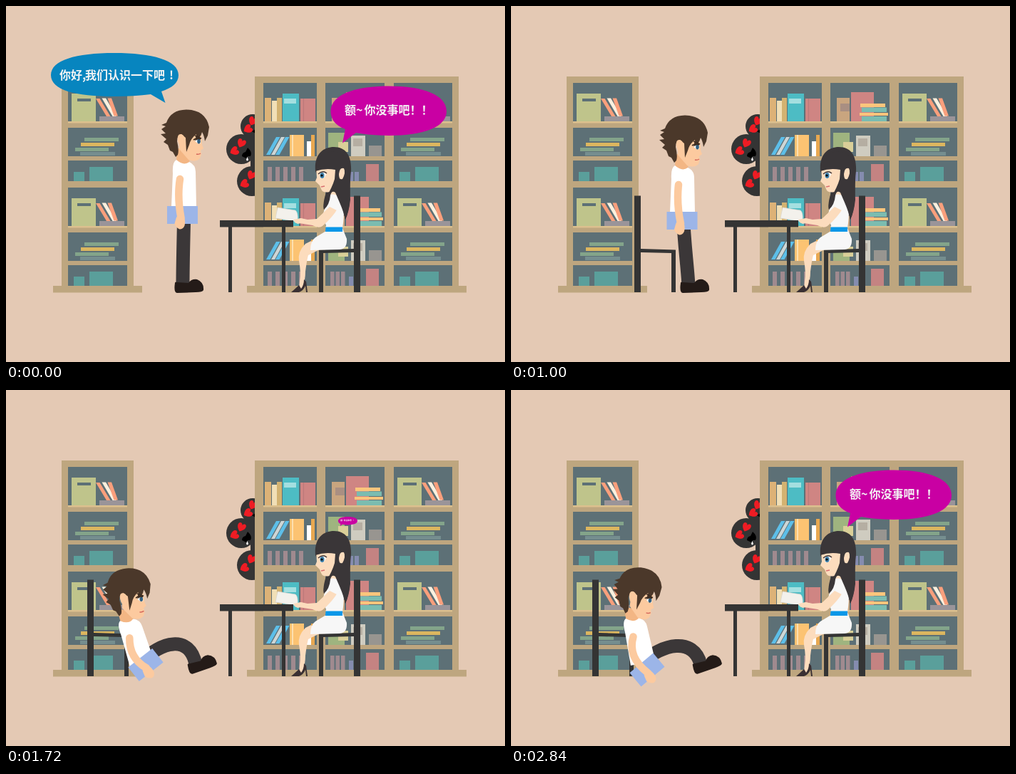
These frames come from a looping animation (700x500 px, 2.88 s). An HTML page:

```html
<!DOCTYPE html>
<html lang="zh-CN">
<head>
<meta charset="utf-8">
<title>图书馆</title>
<style>
  html, body { margin: 0; width: 100%; height: 100%; overflow: hidden; background: #e4c9b4; }
  svg { display: block; width: 700px; height: 500px; }
  text { font: 700 16px "Noto Sans CJK SC", "Noto Sans CJK", "Noto Sans", sans-serif; fill: #f4f4f4; }
</style>
</head>
<body>
<svg viewBox="0 0 700 500">
  <defs>
    <path id="heart" fill="#ee1c24" d="M0,6 C-9,0 -6,-7 -2.5,-6 Q0,-5.500 0,-3 Q0,-5.500 2.500,-6 C6,-7 9,0 0,6z"/>
    <path id="seat" fill="#343434" d="M0,266.500H9V341L58,342.500V402H52V347L9,346V402H0z"/>
  </defs>

  <g id="ornament">
    <g fill="#343434">
      <circle cx="346" cy="169" r="17"/><circle cx="330" cy="201" r="21"/>
      <circle cx="345" cy="246" r="21"/><path d="M343,180h8v50h-8z"/>
    </g>
    <use href="#heart" transform="translate(346 162) rotate(25)"/>
    <use href="#heart" transform="translate(339 173) rotate(60)"/>
    <use href="#heart" transform="translate(330 193) rotate(25)"/>
    <use href="#heart" transform="translate(320 204) rotate(65)"/>
    <use href="#heart" transform="translate(344 238) rotate(25)"/>
    <use href="#heart" transform="translate(334 250) rotate(65)"/>
    <path d="M339,199Q346,205 343,211L339,211L337,214L331,211Q331,206 336,205zM345,176l5,-3v6z"/>
    <path fill="#fff" d="M338.500,212l1.500,4q-1.500,3 -3,0z"/>
  </g>
  <g id="shelves"></g>

  <g id="girl">
    <use href="#seat" transform="matrix(-1 0 0 1 497 0)"/>
    <path fill="#3a3638" d="M434,232C432,208 445,198 460,198C478,198 485,212 484,232C481,256 486,276 476,300Q474,290 468,280L452,276L446,286Q444,277 449,262z"/>
    <path fill="#fcdcbd" d="M428,330L420,334Q409,345 411,358Q414,374 412,387L411,398L416,397Q420,384 420,373Q422,357 424,350L440,342z"/>
    <path fill="#3a3033" d="M400,402Q407,396 411,392L414,397Q418,392 418,384L421,387L423,402H421L420,393Q417,400 411,402z"/>
    <path fill="#fcdcbd" d="M435,228H468V250Q465,258 464,270H452L454,261Q444,263 442,257L440,252L434,246L436,241z"/>
    <path fill="#f7f7f7" d="M451,266Q460,262 468,268Q477,282 472,312L478,327Q479,341 468,342L427,343Q427,330 434,325L449,316Q450,308 446,301Q443,291 449,281z"/>
    <path fill="#0a97e8" d="M448.500,310.500H472V317H448z"/>
    <path fill="#3a3638" d="M434,230Q438,204 460,204Q480,208 481,230Q482,258 483,272Q481,290 476,300Q474,290 468,276L462,262Q457,258 455,266Q454,279 446,286Q444,278 450,267Q458,254 461,243L462,230Q448,227 434,232z"/>
    <path fill="#fcdcbd" d="M467,236Q468,226 474,228Q477,234 472,243Q467,245 467,236z"/>
    <path fill="#fcdcbd" d="M454,282Q462,277 466,283Q459,296 444,309Q439,313 430,308L411,305Q404,306 404,301L414,298L423,300L436,299z"/>
    <path fill="#f7f7f7" d="M455,274L467,274L466,288L452,281z"/>
    <path fill="#fff" d="M440,235Q445,231 449,236Q447,243 441,242z"/>
    <ellipse cx="443.500" cy="238" rx="3" ry="4" fill="#3f7fa8"/><circle cx="443" cy="238" r="1.600"/>
    <path fill="none" stroke="#3a3033" stroke-width="1.400" d="M438,236Q444,230 450,235"/>
    <path fill="none" stroke="#d96f70" stroke-width="1.500" d="M442,254L447,253"/>
  </g>
  <g>
    <path fill="#f3f1ec" stroke="#d9d4ce" stroke-width=".7" d="M381,283L406,287Q410,290 409,301L403,302L378,298z"/>
    <path fill="#343434" d="M300,301H403V310.500H392V402H387V310.500H317V402H312V310.500H300z"/>
    <path fill="#fcdcbd" d="M403,300L414,298L418,304L409,306z"/>
  </g>

  <use id="chair" href="#seat"/>
  <g id="man">
    <path id="leg" fill="none" stroke="#3b3738" stroke-width="19"/>
    <path id="shoe" fill="#241b18" d="M-11,1Q-11,-1 -8,0L8,1Q12,-5 20,-4Q30,0 29,11Q28,14 18,14L-8,15Q-13,15 -11,1z"/>
    <g id="torso">
      <path fill="#f3b684" d="M-9,-18L9,-10L8,6Q1,12 -10,1z"/>
      <path fill="#fff" d="M-10,-1Q0,8 8,2Q17,6 17,16L18,65H-17L-15,18Q-16,2 -10,-1z"/>
    </g>
    <g id="head">
      <path fill="#fcca9f" d="M-5,-36L24,-38L26,-24Q25,-21 28,-15L24,-12L25,-7L23,-1Q17,5 7,1L-6,-14z"/>
      <path fill="#4b382a" d="M-11,-3L-15,-10L-19,-12L-22,-20L-28,-24L-24,-28L-32,-35L-25,-36L-31,-42L-25,-46L-31,-48L-24,-51Q-18,-69 4,-69.500Q31,-69 36,-45L34,-33L30,-25Q29,-33 26,-38Q24,-29 16,-25L18,-35Q10,-29 8,-20L4,-10L3,-30L-3,-35Q-9,-34 -9,-25Q-6,-12 -8,-6z"/>
      <path fill="#fcca9f" d="M-8,-27Q-9,-36 -3,-35Q3,-33 1,-24Q-1,-18 -4,-19Q-7,-20 -8,-27z"/>
      <path fill="#fff" d="M16,-26L24,-28V-22Q19,-21 16,-26z"/>
      <ellipse cx="21.500" cy="-25" rx="2.300" ry="3.400" fill="#315f80"/>
      <path fill="none" stroke="#3b2b20" stroke-width="1.700" d="M14,-27Q18,-30 24,-28M16,-33L25,-29"/>
      <path fill="none" stroke="#d5675c" stroke-width="1.500" d="M18,-7Q21,-6 24,-8"/>
    </g>
    <path id="book" fill="#9cb5e8" d="M-21.500,-12.500H21.500V12.500H-21.500z"/>
    <path id="arm" fill="none" stroke="#fcca9f" stroke-width="10.500" stroke-linecap="round"/>
    <path id="hand" fill="#fcca9f" d="M-7,1Q-6,-4 3,-3Q7,3 5,11Q3,16 -2,16Q-8,13 -9,8z"/>
  </g>
  <path id="burst" fill="#def1fc" d="M-46,12L-24,0L-28,-9L-15,-9L-5,-21L6,-10L26,-13L18,-2L53,4L21,9L33,22L5,14L-4,21L-12,13z"/>

  <g id="hello">
    <path fill="#0785bf" d="M152,66C205,66 242,76 242,97C242,108 233,115 218,120L223.500,136L203,124Q180,127 152,127C97,127 63,118 63,97C63,76 98,66 152,66z"/>
    <text y="103"><tspan x="75">你好,</tspan><tspan x="111">我们认识一下吧</tspan><tspan x="229">!</tspan></text>
  </g>
  <g id="reply">
    <path fill="#c900a3" d="M537,112.500C586,112.500 618,125 618,148C618,170 586,182 537,182Q511,182 491,178L472,192.500L476,173C462,168 455.500,159 455.500,148C455.500,125 488,112.500 537,112.500z"/>
    <text y="152"><tspan x="475">额~</tspan><tspan x="502.500">你没事吧！！</tspan></text>
  </g>
</svg>
<script>
const $ = id => document.getElementById(id);
const WOOD = '#bea67f', BACK = '#5d7076', LEDGE = '#dcc08e';
const rect = (fill, x, y, w, h) => `<rect x="${x}" y="${y}" width="${w}" height="${h}" fill="${fill}"/>`;
const lean = (fill, x, y, w, dx, dy) => `<path fill="${fill}" d="M${x},${y}h${w}l${dx},${dy}h${-w}z"/>`;
const row = (fill, xs, y, w, h) => xs.map(x => rect(fill, x, y, w, h)).join('');

// Each bay is drawn in the coordinates of its upper half; the lower half repeats it.
const bays = {
  stacks: () => rect('#bfc48b', 5, 123, 34, 39) + rect(BACK, 13, 130, 19, 4) +
    lean('#fa9f7c', 39, 130, 5.5, 15, 25) + lean('#fbf0de', 47.5, 129.5, 5.5, 15, 25.5) +
    lean('#fa9f7c', 55.5, 129.5, 5.5, 9, 25) + rect('#9a9499', 44, 155, 35, 7) +
    rect('#83a48a', 23, 185, 48, 5) + rect('#dcb65f', 18, 192, 47, 5) +
    rect('#83a48a', 10, 199, 47, 5) + rect('#758e8f', 17, 205, 49, 5) +
    rect('#5a9f9b', 8, 233, 15, 13) + rect('#5a9f9b', 30, 226, 33, 20),
  upright: () => rect('#ddb277', 2, 129, 9, 33) + rect('#f1dfb6', 12, 133, 7, 29) +
    rect('#d3b271', 19, 129, 7, 33) + rect('#4dbcc4', 27, 123, 23, 39) +
    rect('#a4dfe0', 29, 130, 17, 7) + rect('#cf8583', 52, 130, 21, 32) + rect('#b97679', 56, 130, 1, 32) +
    lean('#5dbfe9', 18, 184, 5.5, -14, 25) + lean('#cdd6d6', 25, 184, 5, -14, 25) +
    lean('#5dbfe9', 31, 184, 5.5, -14, 25) + rect('#fcc372', 37, 181, 20, 30) +
    rect('#fde0b0', 40, 181, 2, 30) + rect('#fff', 61, 190, 6, 21) + rect('#e9a850', 67, 181, 5, 30) +
    row('#a08a8f', [6, 17, 28, 39, 50], 226, 6, 20),
  mixed: () => rect('#c9a57f', 9, 129, 18, 33) + rect('#a98f82', 14, 137, 13, 11) +
    rect('#cf8583', 29, 121, 32, 41) + rect('#fbc57c', 42, 137, 35, 5) + rect('#7bbcb0', 44, 142.5, 35, 6.500) +
    rect('#fbc57c', 41, 150, 40, 4) + rect('#7bbcb0', 44, 155, 35, 7) +
    rect('#9fb47f', 4, 178, 23, 33) + rect('#d9cf98', 18, 191, 14, 14) +
    rect('#cfccc0', 36, 182, 20, 29) + rect('#b5aea2', 39, 186, 13, 11) + rect('#989590', 61, 196, 18, 15) +
    row('#a08a8f', [7, 14.5, 22], 226, 5.5, 20) + row('#858caf', [33, 41], 233, 6, 13) +
    rect('#c48382', 57, 222, 18, 24),
};
const half = (w, draw) => rect(BACK, 0, 108, w, 54) + rect(LEDGE, 0, 162, w, 2.5) +
  rect(BACK, 0, 171, w, 40) + rect(BACK, 0, 217, w, 29) + draw();
const bay = (x, w, draw) => [0, 147].map(y =>
  `<g transform="translate(${x} ${y})">${half(w, draw)}</g>`).join('');
const frame = (x, w, foot) => rect(WOOD, x, 99, w, 294) + rect(WOOD, x - foot, 393, w + 2 * foot, 9.5);
$('shelves').innerHTML = frame(78, 101, 12) + bay(87, 83, bays.stacks) +
  frame(349, 286, 11) + bay(361, 75, bays.upright) + bay(448, 83, bays.mixed) + bay(544, 82, bays.stacks);

// time, easing power | neck x y, head turn, torso turn | elbow | book x y turn | thigh, shin controls | ankle x y turn
const poses = [
  [960, 1, 249, 217, 0, 0, 240, 268, 247.5, 293.5, 0, 249, 330, 248, 360, 248, 388, 0],
  [1000, 1, 240, 225, 0, 0, 232, 277, 240, 301.5, 0, 243, 335, 247, 360, 249, 388, 0],
  [1360, 1, 170, 321, 0, -18, 172, 375, 193, 385, -36, 212, 357, 254, 343, 262, 383, -18],
  [1600, 1, 170, 322, -8, -19, 172, 377, 197, 384, -37, 217, 353, 258, 341, 266, 382, -17],
  [1720, 1, 170, 322, -4, -18, 173, 377, 196, 386, -38, 216, 354, 258, 342, 265, 382, -17],
  [2080, 1, 170, 321, -1, -17, 171, 377, 194, 389, -39, 214, 356, 258, 343, 265, 382, -17],
  [2840, 2, 171, 320, 6, -12, 163, 375, 191, 393, -40, 211, 358, 256, 345, 265, 382, -17],
];
const chairPath = [[240, -62], [440, 127], [480, 157], [520, 182], [640, 173], [1120, 173], [1360, 114]];
const bubbleScale = [[1680, 0], [1920, 1]];
const burstScale = [[1320, .2], [1400, 1], [1440, 1.15]];

function sample(table, t, powered) {
  const i = table.findIndex(k => k[0] > t);
  if (i === 0) return table[0];
  if (i < 0) return table[table.length - 1];
  const a = table[i - 1], b = table[i];
  const p = ((t - a[0]) / (b[0] - a[0])) ** (powered ? b[1] : 1);
  return a.map((v, j) => v + (b[j] - v) * p);
}
const place = (id, x, y, turn = 0, scale = 1) =>
  $(id).setAttribute('transform', `translate(${x} ${y}) rotate(${turn}) scale(${scale})`);
const show = (id, on) => $(id).style.display = on ? '' : 'none';
function rotated(x, y, turn, cx, cy) {
  const a = turn * Math.PI / 180, c = Math.cos(a), s = Math.sin(a);
  return [cx + x * c - y * s, cy + x * s + y * c];
}

function drawMan(t) {
  const [, , x, y, nod, tilt, ex, ey, bx, by, bookTurn, ax, ay, cx, cy, fx, fy, footTurn] = sample(poses, t, true);
  place('head', x, y - 2, nod);
  place('torso', x, y, tilt);
  place('book', bx, by, bookTurn);
  const hand = rotated(-2, 4, bookTurn, bx, by);
  place('hand', ...hand, bookTurn);
  place('shoe', fx, fy, footTurn);
  const hip = rotated(1, 63, tilt, x, y), shoulder = rotated(-5, 26, tilt, x, y);
  const ankle = rotated(0, 4, footTurn, fx, fy);
  $('leg').setAttribute('d', `M${hip}C${ax},${ay} ${cx},${cy} ${ankle}`);
  $('arm').setAttribute('d', `M${shoulder}Q${ex},${ey} ${hand}`);
}

function draw(now) {
  const t = Math.floor(now / 40) * 40 % 2880;
  show('hello', t < 40);
  show('reply', t < 40 || t > 1680);
  show('chair', t >= 280);
  show('burst', t >= 1360 && t < 1480);
  const s = t < 40 ? 1 : sample(bubbleScale, t)[1];
  place('reply', 468 * (1 - s), 191 * (1 - s), 0, s);
  place('chair', sample(chairPath, t)[1], 0);
  place('burst', 196, 409, 0, sample(burstScale, t)[1]);
  drawMan(t);
}

const start = performance.now();
function tick() {
  draw(performance.now() - start);
  requestAnimationFrame(tick);
}
tick();
</script>
</body>
</html>
```
